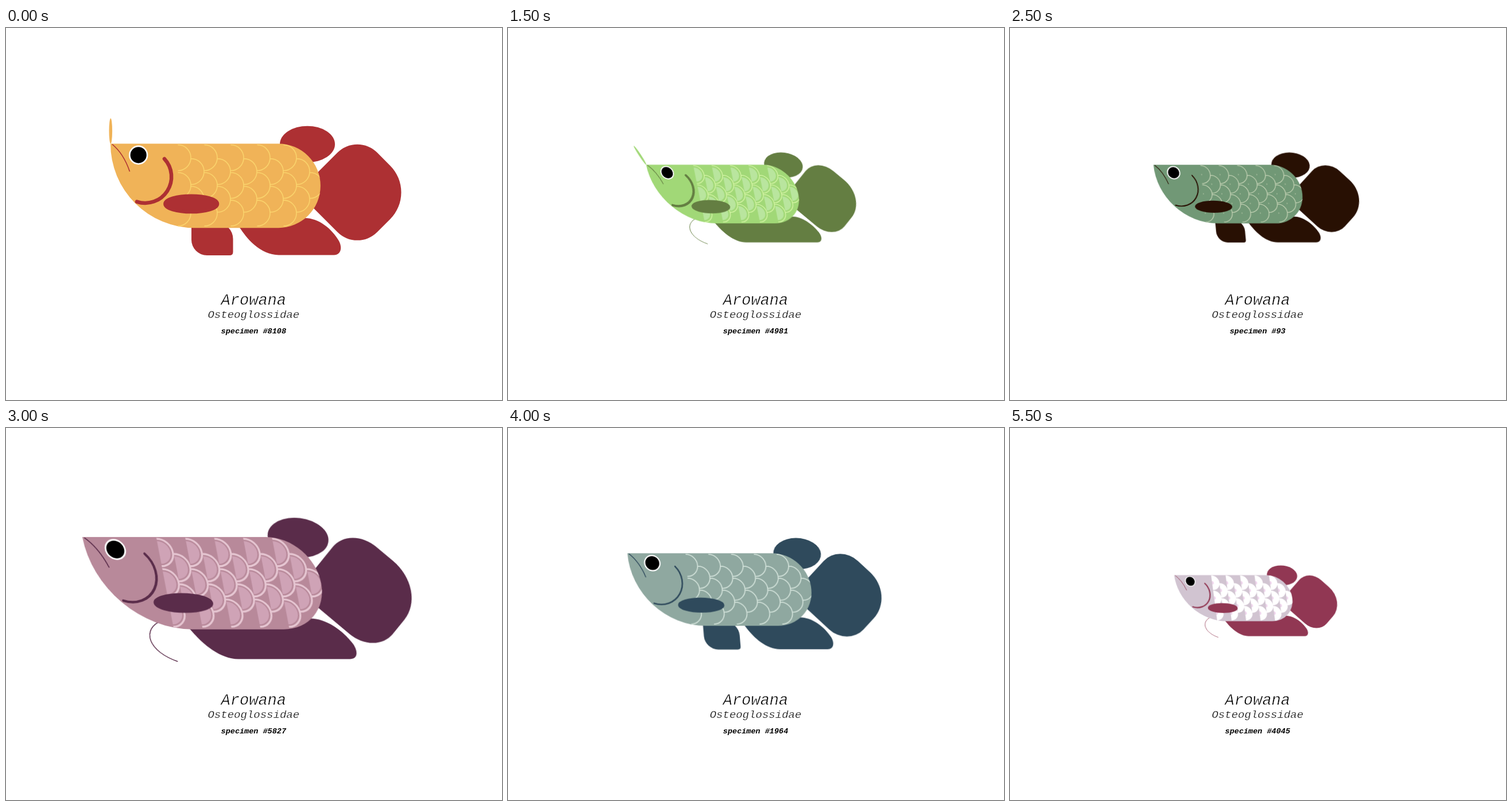
An HTML page that plays this animation: 864 px wide and 648 px high, repeating every 6 s.

```html
<!DOCTYPE html>
<html lang="en">
<head>
<meta charset="utf-8">
<title>Arowana specimens</title>
<style>
  html, body { margin: 0; width: 100%; height: 100%; overflow: hidden; background: #fff; }
  svg { display: block; width: 100%; height: 100%; }
  text {
    font-family: "Courier New", Courier, "Liberation Mono", monospace;
    font-style: italic;
    text-anchor: middle;
    fill: #000;
  }
  /* a white outline thins the letters */
  .name { font-size: 27px; stroke: #fff; stroke-width: 0.6; }
  .family { font-size: 19px; stroke: #fff; stroke-width: 0.4; }
  .number { font-size: 13.5px; font-weight: bold; }
  .card {
    opacity: 0;
    animation: show 6s step-end infinite;
    animation-delay: calc(var(--i) * 0.5s - 6s);
  }
  @keyframes show {
    0% { opacity: 1; }
    8.333333% { opacity: 0; }
    100% { opacity: 0; }
  }
  .line { fill: none; stroke: var(--fin); stroke-width: 1.6; }
  .fin { fill: var(--fin); }
  .side { stroke: var(--fin); }
  .skin { fill: var(--skin); }
  .gill { stroke-linecap: round; }
  .rim { fill: none; stroke: var(--rim); }
  .core { fill: var(--core); }
  .eye { fill: #000; stroke: #fff; stroke-width: 2.6; }
</style>
</head>
<body>
<svg id="stage" viewBox="0 0 864 648">
  <defs>
    <path id="body" d="M182 201.5H474.5A73.35 73.35 0 0 1 474.5 348.2H328.7A146.7 146.7 0 0 1 182 201.5Z"/>
    <clipPath id="inside"><use href="#body"/></clipPath>
  </defs>
  <text class="name" x="431.3" y="481.5">Arowana</text>
  <text class="family" x="431.3" y="505.3">Osteoglossidae</text>
</svg>
<script>
// size: scale, lean: horizontal shear, rim/core: scale pattern,
// long: long anal fin with barbel, feeler: [length, angle] at the nose
const specimens = [
  { no: 8108, size: 1, lean: 0, skin: '#f0b358', fin: '#ad3033', rim: '#fad36c', rimW: 1.6, gill: 6.5, feeler: [44.6, 0] },
  { no: 3553, size: .61, lean: .208, skin: '#849fd9', fin: '#0b2491', rim: '#d3f6fd', rimW: 23.3, gill: 2.8, long: true, feeler: [56, -12.4] },
  { no: 2716, size: .746, lean: .171, skin: '#d9a98c', fin: '#7a4030', rim: '#f4dcc4', rimW: 2.4, core: '#e8c0a4', coreR: 16, gill: 4 },
  { no: 4981, size: .697, lean: .202, skin: '#a1d877', fin: '#647e42', rim: '#d6f6a6', rimW: 1.9, core: '#b9e59e', coreR: 17.5, gill: 5.8, long: true, feeler: [52, -24.5] },
  { no: 6342, size: 1.075, lean: .15, skin: '#c9b26a', fin: '#6b5426', rim: '#e9dca4', rimW: 2, gill: 4, feeler: [42.5, -49] },
  { no: 93, size: .696, lean: .095, skin: '#719876', fin: '#281003', rim: '#c3d2b4', rimW: 1.8, core: '#a9bf9f', coreR: 2, gill: 2.8 },
  { no: 5827, size: 1.095, lean: .191, skin: '#b8899a', fin: '#5a2c4a', rim: '#e6c6d2', rimW: 3, core: '#cfa3b6', coreR: 18, gill: 4, long: true },
  { no: 4743, size: .803, lean: .142, skin: '#90c2cd', fin: '#458153', rim: '#c3f2e8', rimW: 2.4, core: '#9bcbfb', coreR: 19, gill: 3 },
  { no: 1964, size: .862, lean: .081, skin: '#8fa8a0', fin: '#2f4a5c', rim: '#d0e0d8', rimW: 2, gill: 3 },
  { no: 419, size: .928, lean: .165, skin: '#757b85', fin: '#3d2c25', rim: '#c1b5c9', rimW: 5.5, core: '#9f899d', coreR: 18.5, gill: 3, long: true },
  { no: 7230, size: .736, lean: .19, skin: '#e0b9a0', fin: '#94503c', rim: '#f6e4d6', rimW: 4, core: '#ecccb8', coreR: 20, gill: 3.5 },
  { no: 4045, size: .548, lean: .134, skin: '#d1c4d1', fin: '#913753', rim: '#ffffff', rimW: 18, core: '#f1d6ee', coreR: 6, gill: 4, long: true }
];

const halfDisc = (x, y, r) => `M${x} ${y - r}a${r} ${r} 0 0 1 0 ${2 * r}`;

function scales(s) {
  const reach = 23.3, rows = [5, 5, 6, 5, 5];
  let rims = '', cores = '';
  rows.forEach((count, row) => {
    const y = 226 + row * 24.1;
    for (let col = 0; col < count; col++) {
      const x = 299.5 + col * 46 + (row % 2) * 23;
      rims += halfDisc(x, y, reach - s.rimW / 2);
      if (s.coreR) cores += halfDisc(x, y, s.coreR) + 'z';
    }
  });
  return `<g clip-path="url(#inside)">
    <path class="core" d="${cores}"/>
    <path class="rim" stroke-width="${s.rimW}" d="${rims}"/></g>`;
}

function lowerFins(long) {
  const dx = long ? -82 : 0;
  const anal = `<path class="fin" d="M${400 + dx} 338L${409 + dx} 350.5C${424 + dx} 373 ${447 + dx} 395.5 ${475 + dx} 395.5
    H571C584 395.5 586 382 580 371C568 350 545 331 520 331L500 320Z"/>`;
  const extra = long
    ? '<path class="line" style="stroke-width:1.4" d="M277 337C248 352 254 384 296 399.4"/>'
    : '<path class="fin" d="M323 330L368 339.5A27.5 28 0 0 1 395.5 367.5V390Q395.5 396 389.5 396H350A27 27 0 0 1 323 369Z"/>';
  return anal + extra;
}

function feeler([length, angle]) {
  const r = length / 2;
  return `<ellipse class="skin" cx="182.3" cy="${201.8 - r}" rx="2.8" ry="${r}" transform="rotate(${angle} 182.3 201.5)"/>`;
}

function fish(s) {
  return `<g transform="translate(431.5 322.5) matrix(${s.size} 0 ${s.size * s.lean} ${s.size} 0 0) translate(-431.5 -322.5)">
    <ellipse class="fin" cx="525" cy="202.4" rx="48" ry="31.7"/>
    <path class="fin" transform="translate(612 286.3) rotate(45)"
      d="M-24.5 -73.4H7.4A66 66 0 0 1 73.4 -7.4V24.5A48.9 48.9 0 0 1 24.5 73.4H-73.4V-24.5A48.9 48.9 0 0 1 -24.5 -73.4Z"/>
    ${lowerFins(s.long)}
    ${s.feeler ? feeler(s.feeler) : ''}
    <use href="#body" class="skin"/>
    ${scales(s)}
    <path class="line" d="M185 202.5Q205 219 215.5 250"/>
    <circle class="eye" cx="230.7" cy="221.3" r="15.4"/>
    <g stroke-width="${s.gill}">
      <path class="line gill" style="stroke-width:inherit" d="M276 228A45.8 45.8 0 0 1 228 302.6"/>
      <ellipse class="fin side" cx="322.7" cy="306.4" rx="45.3" ry="13.7"/>
    </g>
  </g>`;
}

document.getElementById('stage').insertAdjacentHTML('beforeend', specimens.map((s, i) =>
  `<g class="card" style="--i:${i};--skin:${s.skin};--fin:${s.fin};--rim:${s.rim};--core:${s.core || 'none'}">
    ${fish(s)}<text class="number" x="431.3" y="532">specimen #${s.no}</text></g>`).join(''));
</script>
</body>
</html>
```
